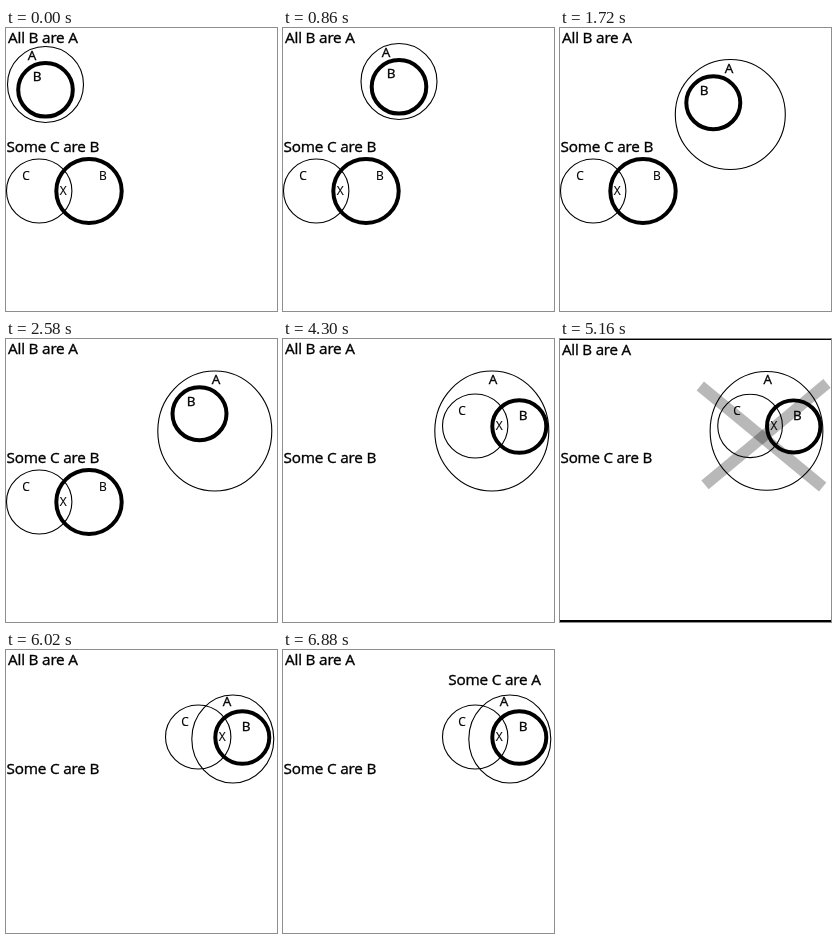
An HTML page for the animation above (7740 ms loop, 271 by 283 pixels).

```html
<!DOCTYPE html>
<html lang="en">
<head>
<meta charset="utf-8">
<title>Syllogism diagram</title>
<style>
html, body { margin: 0; width: 100%; height: 100%; overflow: hidden; background: #fff; }
svg { display: block; width: 100%; height: 100%; }
text { font: 15.3px "Open Sans", "Noto Sans", sans-serif; letter-spacing: -.2px; stroke: #000; stroke-width: .35; }
.label { font-size: 13.5px; letter-spacing: 0; text-anchor: middle; }
.small { font-size: 12px; stroke-width: .15; }
ellipse { fill: none; stroke: #000; stroke-width: 1.1; }
.bold { stroke-width: 4; }
.part { animation: 7740ms step-end infinite; }

/* Nine equal steps per loop */
#ringA { animation-name: ringA; }
#nameA { animation-name: nameA; }
#ringB { animation-name: ringB; }
#nameB { animation-name: nameB; }
#setC { animation-name: setC; }
#premiseB { animation-name: premiseB; }
#diagram { animation-name: squeeze; }
#cross { animation-name: cross; }
#conclusion { animation-name: conclusion; }

@keyframes ringA {
  0% { cx: 39.5px; cy: 56.5px; rx: 38px; ry: 38px; }
  11.11% { cx: 116px; cy: 53.5px; rx: 38px; ry: 38px; }
  22.22% { cx: 170.3px; cy: 86.5px; rx: 55px; ry: 55px; }
  33.33% { cx: 208.8px; cy: 92px; rx: 57px; ry: 60px; }
  77.77%, 100% { cx: 226.8px; cy: 89px; rx: 41px; ry: 44px; }
}
@keyframes nameA {
  0% { transform: translate(26px, 27px); }
  11.11% { transform: translate(103px, 24px); }
  22.22% { transform: translate(169px, 40px); }
  33.33% { transform: translate(210px, 40px); }
  77.77%, 100% { transform: translate(221px, 51px); }
}
@keyframes ringB {
  0% { cx: 39.5px; cy: 61.8px; rx: 27.3px; ry: 26.8px; }
  11.11% { cx: 116px; cy: 58.8px; rx: 27.3px; ry: 26.8px; }
  22.22% { cx: 153.3px; cy: 74.8px; rx: 27px; ry: 26.5px; }
  33.33% { cx: 193.5px; cy: 74.8px; rx: 27px; ry: 26.5px; }
  44.44%, 100% { cx: 236.3px; cy: 87.5px; rx: 27px; ry: 26.3px; }
}
@keyframes nameB {
  0% { transform: translate(31px, 48px); }
  11.11% { transform: translate(108px, 45px); }
  22.22% { transform: translate(144px, 62px); }
  33.33% { transform: translate(185px, 62px); }
  44.44%, 100% { transform: translate(240px, 76px); }
}
@keyframes setC {
  0% { transform: none; }
  44.44% { transform: translate(49px, 5px); }
  55.55%, 100% { transform: translate(159px, -76px); }
}
@keyframes premiseB {
  0% { transform: none; visibility: visible; }
  44.44% { transform: translate(49px, 5px); visibility: visible; }
  55.55%, 100% { visibility: hidden; }
}
@keyframes squeeze {
  0%, 77.77%, 100% { transform: none; }
  66.66% { transform: translate(0, .8px) scale(.989, .99); }
}
@keyframes cross {
  0%, 77.77%, 100% { visibility: hidden; }
  66.66% { visibility: visible; }
}
@keyframes conclusion {
  0% { visibility: hidden; }
  88.88%, 100% { visibility: visible; }
}
</style>
</head>
<body>
<svg viewBox="0 0 271 283" preserveAspectRatio="none">
  <g id="cross" class="part" stroke="#000">
    <g stroke-width="11.5" stroke-opacity=".28">
      <path d="M140.3 47 262.7 148"/>
      <path d="M267 44.3 145 145.8"/>
    </g>
    <path d="M0 .5H271"/>
    <path d="M0 282H271" stroke-width="2"/>
  </g>
  <g id="diagram" class="part">
    <text x="2" y="15">All B are A</text>
    <text x=".6" y="124">Some C are B</text>
    <text id="conclusion" class="part" x="165.3" y="35">Some C are A</text>

    <ellipse id="ringA" class="part"/>
    <ellipse id="ringB" class="part bold"/>
    <text id="nameA" class="part label" y="5">A</text>
    <text id="nameB" class="part label" y="5">B</text>

    <g id="setC" class="part">
      <ellipse cx="33.2" cy="163" rx="32.7" ry="32"/>
      <text class="label small" x="20" y="152.2">C</text>
      <text class="label small" x="57.3" y="167">X</text>
    </g>
    <g id="premiseB" class="part">
      <ellipse class="bold" cx="83" cy="163" rx="32.7" ry="32"/>
      <text class="label small" x="97" y="152.4">B</text>
    </g>
  </g>
</svg>
</body>
</html>
```
